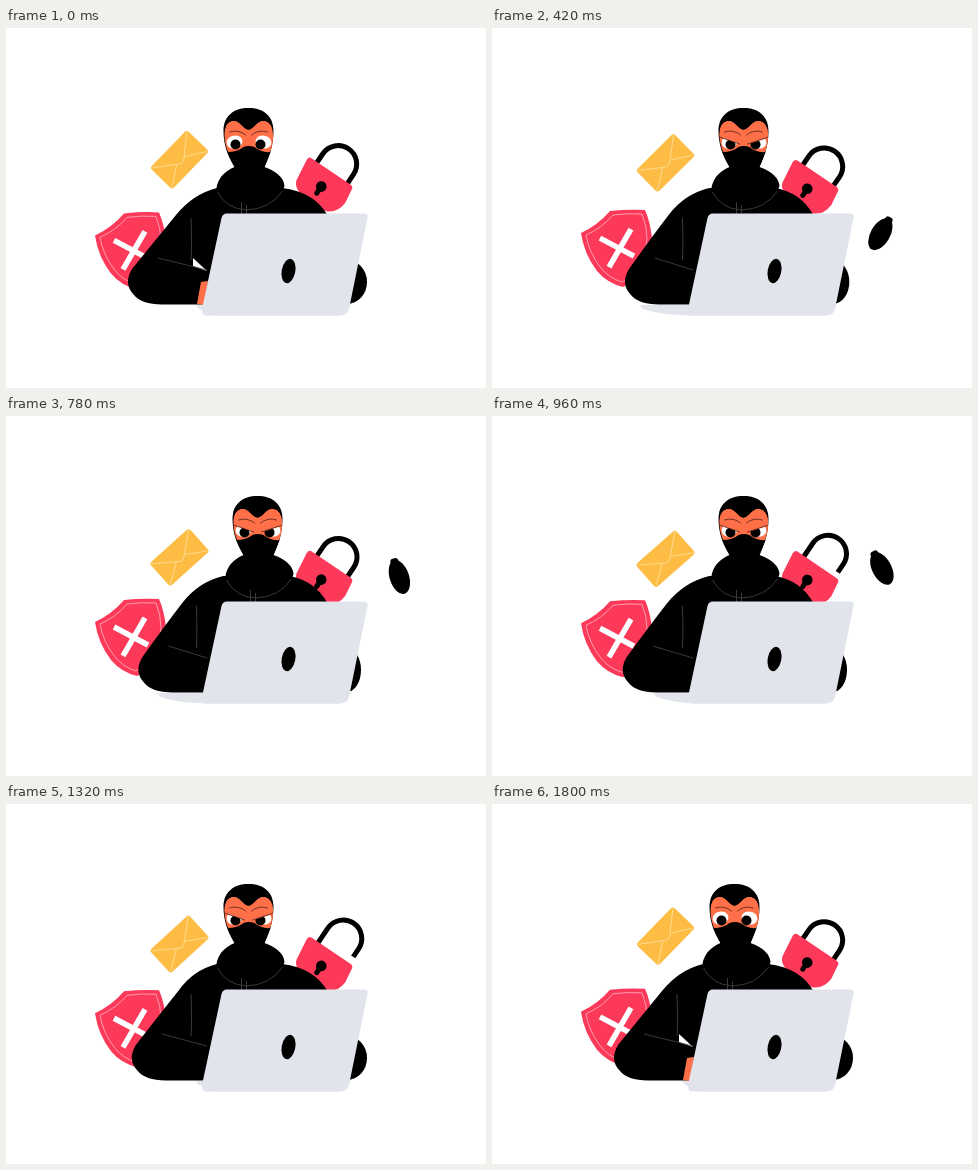
An HTML page that plays this animation: 480 by 360 pixels, repeating every 1.86 s.

```html
<!DOCTYPE html>
<html lang="en">
<head>
<meta charset="utf-8">
<title>Masked intruder at a laptop</title>
<style>
html, body { margin: 0; width: 100%; height: 100%; overflow: hidden; background: #fff; }
svg { display: block; width: 100vw; height: 100vh; }
.red { fill: #fd395a; }
.skin { fill: #ff7048; }
.metal { fill: #e1e4eb; }
.seam { fill: none; stroke: #484848; stroke-width: .8; }
.fine { fill: none; stroke: #ffdc94; stroke-width: .9; }
.brow { fill: none; stroke: #391812; stroke-width: .7; stroke-linecap: round; }
</style>
</head>
<body>
<svg viewBox="0 0 480 360">
  <defs>
    <path id="opening" d="M218 106Q218 95 226 93C233 92 236 101 242 102C248 101 251 92 258 93Q266 95 266.5 106Q267 117 263 125H222Q218 116 218 106Z"/>
    <clipPath id="faceClip"><use href="#opening"/></clipPath>
  </defs>

  <g id="mail">
    <rect x="-26.5" y="-15.5" width="53" height="31" rx="3" fill="#fdbc43"/>
    <path class="fine" d="M-25-14L-3 3Q0 5 3 3L25-14M-25 14L-5 1M25 14L5 1"/>
  </g>

  <g id="shield">
    <path class="red" d="M89 205Q106 197 118 183Q136 181 153 182Q158 193 160 210Q158 246 131 259Q115 255 105 243Q92 226 89 205Z"/>
    <path d="M94 207Q110 200 121 187Q136 185 150 186Q155 198 155 211Q152 243 130 254Q117 250 109 240Q97 225 94 207Z" fill="none" stroke="#ffb4c0" stroke-width=".8"/>
    <path d="M108 210L142 228M139 201L117 239" stroke="#fff" stroke-width="5.5"/>
  </g>

  <g id="lock">
    <g transform="translate(324.5 143) rotate(34)">
      <path id="shackle" fill="none" stroke="#000" stroke-width="5"/>
      <path class="red" d="M-23 0H24Q28 0 28 4L30 18Q29 32 18 36H-12Q-21 33-23 27L-26 4Q-26 0-23 0Z"/>
      <circle cx="1" cy="18" r="5.3"/>
      <path d="M1 18V26" stroke="#000" stroke-width="5" stroke-linecap="round"/>
    </g>
  </g>

  <g id="hand">
    <ellipse rx="9.7" ry="17.5"/>
    <rect x="-4" y="-19.5" width="8" height="7" rx="3"/>
  </g>

  <ellipse id="elbow" cx="341" cy="254" ry="22"/>
  <path id="torso"/>
  <path id="gap" d="M187 230V238L201 243Z" fill="#fff"/>
  <path id="seams" class="seam"/>

  <g id="head">
    <path d="M217 103C217 88 227 80 242 80S267 88 267 103C267 119 262 130 258 139Q277 146 278 158C273 175 258 183 243 183S215 176 210 160Q212 146 228 139C221 128 217 116 217 103Z"/>
    <path class="seam" d="M211 164Q220 181 240 182Q264 181 276 163M235 174V186M240 177V186"/>
    <use href="#opening" class="skin"/>
    <g clip-path="url(#faceClip)">
      <ellipse cx="228" cy="114" rx="8" ry="6.5" transform="rotate(-12 228 114)" fill="#fff"/>
      <ellipse cx="257" cy="114" rx="8" ry="6.5" transform="rotate(12 257 114)" fill="#fff"/>
      <circle cx="229" cy="116.5" r="5"/>
      <circle cx="254" cy="116.5" r="5"/>
      <g id="lids">
        <path class="skin" d="M214 90H242V116L217 107ZM242 90H271V107L242 116Z"/>
        <path id="creases" class="brow" d="M218 107.5L238 114.5M267 107.5L246 114.5"/>
      </g>
      <path class="brow" d="M223 104Q232 101 239 107M261 104Q252 101 245 107"/>
    </g>
    <path d="M221 124Q231 124 237 119Q242 117 248 119Q255 125 264 124L258 139H228Z"/>
  </g>

  <path id="fingers" class="skin" d="M195 254L202 253L198 277L191 276Z"/>
  <path id="base" class="metal"/>
  <path class="metal" d="M221 185.500H358Q362.500 185.500 361.500 190L343 281Q341 287.500 334 287.500H199Q196 287 196 281L215.500 190Q216.500 185.500 221 185.500Z"/>
  <ellipse cx="282.500" cy="243" rx="6.800" ry="12.300" transform="rotate(11 282.500 243)"/>
</svg>
<script>
const LOOP = 1860, STEP = 60;
const PIVOT = { x: 340, y: 178 };

const clamp = x => Math.min(1, Math.max(0, x));
const ease = x => (1 - Math.cos(Math.PI * clamp(x))) / 2;

// Floats from 0 to height and back, highest at the peak time.
const float = (t, height, peak) => height / 2 * (1 + Math.cos(2 * Math.PI * (t - peak) / LOOP));

// Eases 0 to 1 over a..b, holds, then eases back over c..d.
const pulse = (t, a, b, c, d) => ease((t - a) / (b - a)) - ease((t - c) / (d - c));

const put = (id, attr, value) =>
  document.getElementById(id).setAttribute(attr, value);

function drawProps(t) {
  const rise = float(t, 11.5, 1010);
  put("mail", "transform", `translate(173.5 ${131.5 + rise}) rotate(${rise * .4 - 46})`);
  put("shield", "transform", `translate(0 ${float(t, 4.4, 1420)})`);
  put("lock", "transform", `translate(0 ${float(t, 5.5, 930)})`);

  const open = 7 * pulse(t, 720, 1080, 1380, 1620);
  put("shackle", "d", `M${-16 + open * .2} 8V${-10 - open}
    a18.5 18.5 0 0 1 37 0V${1 - open * 1.2}`);
}

// The forearm swings up around its pivot, then draws back in.
function drawHand(t) {
  const turn = 105 * clamp((960 - t) / 780) ** 1.65 - 27;
  const reach = 56 * pulse(t, -200, 340, 960, 1200);
  const a = turn * Math.PI / 180;
  const x = PIVOT.x + reach * Math.cos(a), y = PIVOT.y + reach * Math.sin(a);
  put("hand", "transform", `translate(${x} ${y}) rotate(${turn})`);
  put("hand", "visibility", t > STEP && t < 1140 ? "visible" : "hidden");
}

function drawBody(t) {
  const lean = 9 * pulse(t, 30, 300, 960, 1260);
  const slide = 11 * pulse(t, 0, 420, 600, 1800);
  const squint = pulse(t, 240, 360, 1440, 1620);
  const arm = 122 + slide, seam = 185 + lean * .6;

  put("elbow", "rx", 20 - 6 * pulse(t, 180, 600, 960, 1320));
  put("torso", "d", `M${211 + lean * .7} 160
    Q${187 + lean * .6} 166 ${170 + slide * .6} 187
    Q${152 + slide * .7} 209 ${arm + 4} 241
    Q${arm - 5} 256 ${arm + 6} 267
    Q${arm + 13} 276 ${arm + 34} 276.5
    H205L235 282H330L322 188Q309 164 ${276 + lean * .7} 160Z`);
  put("seams", "d", `M${seam} 190Q${seam + 1} 215 ${seam} 232M${arm + 30} 230L201 242`);

  put("head", "transform", `translate(${lean + .5} 0)`);
  put("lids", "transform", `translate(0 ${10.5 * squint - 9})`);
  put("creases", "opacity", squint);

  const typing = squint < .5 ? "visible" : "hidden";
  put("gap", "visibility", typing);
  put("fingers", "visibility", typing);
  put("fingers", "transform", `translate(${slide * .5} 0)`);

  const edge = 190 - 6 * Math.max(0, slide - 4);
  put("base", "d", `M${edge} 277H345L334 287.5H208Q${edge + 22} 287.5 ${edge + 3} 281Z`);
}

const start = performance.now();
function tick() {
  const now = (performance.now() - start) % LOOP;
  const t = Math.floor(now / STEP) * STEP;
  drawProps(t);
  drawHand(t);
  drawBody(t);
  requestAnimationFrame(tick);
}
tick();
</script>
</body>
</html>
```
